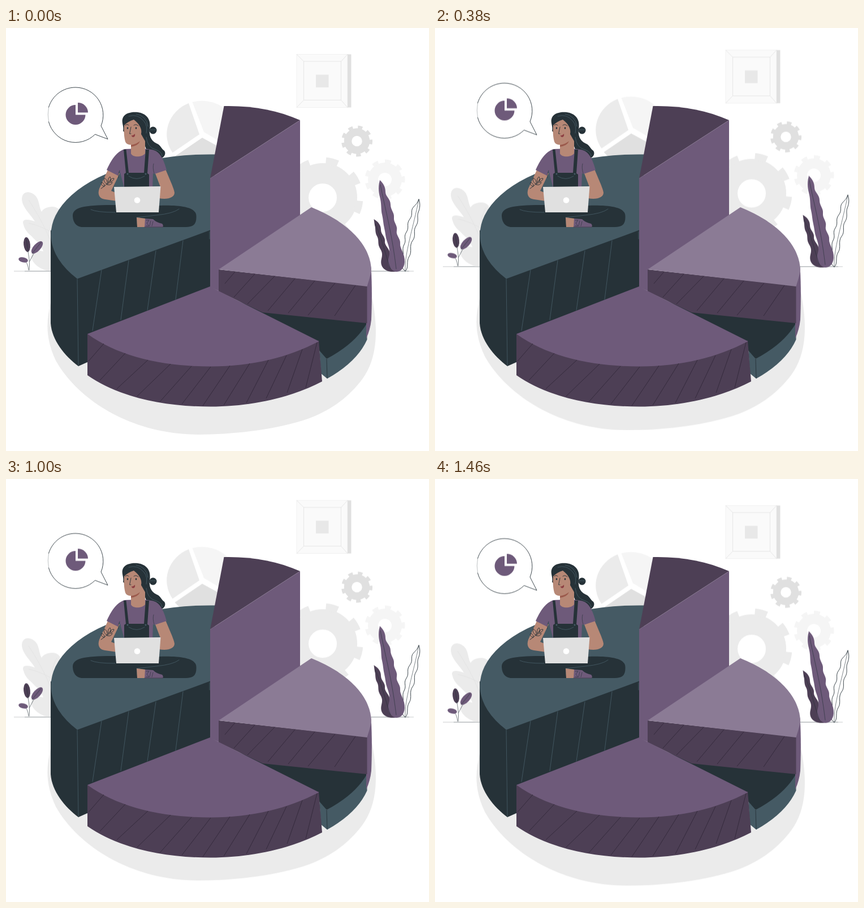
Write an HTML page that moves like this. It is 748x748 px and loops after 1500 ms.

```html
<!DOCTYPE html>
<html lang="en">
<head>
<meta charset="utf-8">
<title>Pie chart</title>
<style>
  html, body { margin: 0; width: 100%; height: 100%; overflow: hidden; background: #fff; }
  svg { display: block; width: 100%; height: 100%; }

  #backdrop { animation: float 1.5s linear -28ms infinite; }
  @keyframes float {
    0%, 100% { transform: translateY(.55px); }
    50% { transform: translateY(-14.3px); }
  }

  .purple { fill: #6e5a7a; }
  .plum { fill: #4d3f55; }
  .lilac { fill: #8b7b95; }
  .teal { fill: #455a64; }
  .ink { fill: #263238; }
  .skin { fill: #b78876; }
  .g1 { fill: #f5f5f5; }
  .g2 { fill: #ebebeb; }
  .g3 { fill: #e0e0e0; }
  .line { fill: none; stroke: #263238; stroke-width: .9; stroke-linecap: round; stroke-linejoin: round; }
  .fine { stroke-width: .6; }
  .seam { fill: none; stroke: #455a64; stroke-width: .9; stroke-linecap: round; }
  .vein { fill: none; stroke: #e2e2e2; stroke-width: .8; }
  .hatch { fill: none; stroke: #33293a; stroke-width: .9; }
  .gear { fill: none; }
</style>
</head>
<body>
<svg viewBox="0 0 748 748">
  <g id="backdrop">
    <!-- floor and shadow -->
    <path d="M14 430H721" stroke="#263238" stroke-width=".4" opacity=".6"/>
    <path d="M33 430H713" stroke="#263238" stroke-width=".5" opacity=".6"/>
    <path class="g2" d="M79 486C70 522 71 552 88 588C126 656 218 718 340 719C400 718.5 465 712 525 694C572 679 606 653 630 621C656 585 660 536 646 470Z"/>

    <!-- picture frame -->
    <path fill="#fafafa" stroke="#ececec" stroke-width=".7" d="M514 46.500H604V140.500H514Z"/>
    <path class="g3" d="M604 46.500H610.500V140.500H604Z"/>
    <path fill="none" stroke="#dedede" stroke-width=".7" d="M526.500 59H592.500V127.500H526.500ZM514 46.500L526.500 59M604 46.500L592.500 59M514 140.500L526.500 127.500M604 140.500L592.500 127.500"/>
    <path fill="#e8e8e8" d="M548 82.500H570.500V105H548Z"/>

    <!-- gears -->
    <g class="gear" stroke="#ebebeb">
      <circle cx="560" cy="300" r="43" stroke-width="36"/>
      <circle cx="560" cy="300" r="65" stroke-width="13" pathLength="16" stroke-dasharray=".84 1.160" transform="rotate(-85 560 300)"/>
    </g>
    <g class="gear" stroke="#e0e0e0">
      <circle cx="620.500" cy="200" r="16" stroke-width="13.500"/>
      <circle cx="620.500" cy="200" r="24.500" stroke-width="6" pathLength="18" stroke-dasharray=".95 1.050" transform="rotate(-86 620.500 200)"/>
    </g>
    <g class="gear" stroke="#f5f5f5">
      <circle cx="670" cy="268" r="21" stroke-width="18"/>
      <circle cx="670" cy="268" r="32" stroke-width="7" pathLength="18" stroke-dasharray=".95 1.050" transform="rotate(-90 670 268)"/>
    </g>

    <!-- wall chart -->
    <path class="g2" d="M323 133L342 188L294.500 220.500A63 59.500 0 0 1 323 133Z"/>
    <path class="g1" d="M329.500 131A63 59.500 0 0 1 403 215L350 184Z"/>
    <path class="g3" d="M347 194L298.500 227A63 59.500 0 0 0 400 223Z"/>

    <!-- speech bubble -->
    <path class="line" d="M75.500 140C82 119 101 105 123 105A49 49 0 0 1 168 173L180 196.500L157.500 188A49 49 0 0 1 75.500 166"/>
    <path class="line fine" opacity=".5" d="M75.500 140Q73 153 75.500 166"/>
    <path class="purple" d="M123 136V153.500H140.500A17.500 17.500 0 1 1 123 136Z"/>
    <path class="purple" d="M127 132A18 17.500 0 0 1 145 149.500H127Z"/>

    <!-- pale foliage -->
    <path class="g2" d="M28 303C28 290 39 287 49 294C60 302 57 314 63 325C66 318 79 314 88 317C96 320 98 327 95 335L86 429H72C57 425 45 414 45 404C45 395 57 392 66 395C62 382 53 377 45 368C43 366 34 360 31 348C26 336 41 338 51 342C44 330 29 318 28 303Z"/>
    <path class="vein" d="M40 304C54 326 69 350 84 390M40 345Q62 350 82 362M90 325Q81 340 82 356"/>

    <!-- sprig -->
    <path class="line fine" d="M41 428C43 411 39 398 37 384M41.500 413Q48 400 55 389M40 428Q39 415 31 409"/>
    <ellipse class="plum" cx="37" cy="383" rx="5.800" ry="13" transform="rotate(-6 37 383)"/>
    <ellipse class="purple" cx="55" cy="388" rx="6.300" ry="13.500" transform="rotate(42 55 388)"/>
    <ellipse class="purple" cx="30.500" cy="410" rx="8.500" ry="4.500" transform="rotate(14 30.500 410)"/>
    <path class="line fine" d="M36 373L39 396M62 379L46 399"/>

    <!-- tall plants -->
    <path class="line" d="M730 303C733 311 732 319 729 326S731 341 725 350S726 367 719 376S719 395 713 404S713 424 706 430C700 426 697 416 701 407S699 392 704 383S702 370 708 361S707 347 714 338S714 323 721 316S727 309 730 303"/>
    <path class="line fine" d="M706 430C704 400 721 350 730 303"/>
    <path class="plum" d="M650.500 338C659 343 663 349 663 357S671 369 670 377S679 390 679 400L692 431H681C667 429 661 420 664 408S663 394 660 387S660 375 656 368S654 354 652 349Z"/>
    <path class="purple" d="M661 269C668 275 671 282 671 290S680 302 680 312S687 326 686 335S693 349 691 358S698 372 697 381S706 399 705 414C704 426 697 432 688 431C676 425 674 415 677 405S677 386 674 378S671 362 669 354S667 338 665 330S664 312 662 303S657 284 661 269Z"/>
    <path class="line fine" d="M662 277C669 315 682 358 690 426M653 346C665 372 672 405 680 426"/>
  </g>

  <!-- large slice -->
  <path class="ink" d="M79 357V522C81 552 104 580 128 598L146 590L365 470V345L126 440Z"/>
  <path class="teal" d="M362 357L126 443.500A282 142 0 0 1 372 223.500Z"/>
  <path class="seam" d="M126 444L128 597M169 428L153 535M217 411L203 516M265 394L250 499M313 376L300 480M360 360V373"/>

  <!-- tall slice -->
  <path class="purple" d="M361 266L520 163V334L378 428V466L361 458Z"/>
  <path class="plum" d="M385.500 138C435 137 480 145 520 163L361 266Z"/>
  <path fill="none" stroke="#8b7b95" stroke-width=".6" d="M361 266L520 163"/>

  <!-- low slice -->
  <path class="teal" d="M553 553L567 585L638.500 521V551A282 150 0 0 1 568 620L557 611Z"/>
  <path class="ink" d="M376 462L454 495L638.500 515V521.500A282 150 0 0 1 567 585L545 560Z"/>
  <path class="line" d="M567 585L568 619"/>

  <!-- right slice -->
  <path class="purple" d="M637 457L645.500 422C647.500 455 647 490 646 516Q644 534 637 549Z"/>
  <path class="plum" d="M376 427L638.500 456V522L454 503L376 466Z"/>
  <path class="lilac" d="M540 317A270 142 0 0 1 646 430Q643 443 638.500 457L376 427Z"/>
  <path class="hatch" d="M405 431L387 452M440 435L403 476M475 439L427 488M511 443L463 500M546 447L499 504M582 451L534 508M618 455L581 509"/>

  <!-- front slice -->
  <path class="plum" d="M144 541V614C199 652 276 669.500 361 669.500C437 669.500 508 652 559 625L553 553Z"/>
  <path class="purple" d="M361 457L144 541C199 581 278 598.500 361 598.500C436 598.500 500 582 553.500 554L376 465Z"/>
  <path class="hatch" d="M173 558L146 589M211 575L166 623M251 587L196 638M291 594L232 651M328 598L272 661M362 599L311 665M396 597L348 668M431 593L385 667M464 587L425 663M496 579L460 655M524 568L497 645M550 556L530 636"/>

  <!-- hair -->
  <path class="ink" d="M207 182C209 173 203 166 207 158C211 150 223 148 233 149C248 151 256 161 254.500 175C252 190 256 199 266 204C274 207 274 213 280 217C284 223 279 231 270 231C262 231 255 227 252 222C247 216 247 208 243 203H228Z"/>
  <circle class="ink" cx="260" cy="181" r="6.500"/>
  <path class="seam" d="M217 156Q233 151 244 165Q251 173 248 186M230 152Q248 155 251 174M255 180H265M248 193Q250 211 264 215Q275 218 276 226"/>

  <!-- arms and shirt -->
  <path class="skin" d="M181 249L165 284C161 295 166 302 175 303L196 306V292L186 288L201 257Z"/>
  <path class="skin" d="M262 252L273 281L270 301C286 304 298 300 298 291C297 283 288 265 281 247Z"/>
  <path class="purple" d="M210 214C194 219 185 236 178 251L198 261L201 252L209 283H259L260 257L263 258L284 251C279 234 273 217 257 215L243 213Z"/>
  <path class="line fine" d="M201 252Q198 257 199 265M262 257Q259 247 261 240"/>
  <path class="skin" d="M221 198V222C224 229 240 229 246 222V200L238 186Z"/>
  <path fill="#9b5a4c" d="M221 206Q231 205 237 200Q234 208 221 210Z"/>

  <!-- face -->
  <path class="skin" d="M209 172C208 184 209 194 211 201C214 209 229 208 235 200L239 187C241 178 235 169 226 162Q216 165 209 172Z"/>
  <path class="line" d="M211 172Q214 169 217 172M226 172Q230 169 234 173M221 175L218.500 187H221"/>
  <path fill="#8d3f42" d="M221 190Q225 191 228 187Q229 193 224 193Z"/>
  <ellipse class="ink" cx="215" cy="177" rx="1.300" ry="1.800"/>
  <ellipse class="ink" cx="230" cy="177" rx="1.300" ry="1.800"/>

  <!-- dungarees -->
  <path class="ink" d="M208 215H212.500L217 256H244L247 215H253L250 257L253 259V284H209V258L212 256Z"/>
  <path class="seam" d="M217 262Q231 271 245 262"/>
  <circle class="teal" cx="215" cy="258" r="1.500"/>
  <circle class="teal" cx="247" cy="258" r="1.500"/>

  <!-- tattoo -->
  <path class="line" d="M168 284Q176 279 186 268M173 280Q167 278 169 273Q175 275 174 280M178 276Q171 271 174 265Q180 269 179 275M181 273Q179 266 184 263Q187 268 182 272M179 277Q186 279 188 273Q182 272 179 277M184 271Q190 272 191 266Q186 265 184 271"/>

  <!-- legs -->
  <path class="ink" d="M118 331C119 315 145 313 196 313L272 314C310 313 337 317 336.500 333C337 349 330 352 314 352H278L246 337L231 335L232 352H136C123 352 118 342 118 331Z"/>
  <path class="seam" d="M150 321Q160 326 193 326M306 320Q296 328 266 331L231 335"/>
  <path class="skin" d="M231 335L247 337V352H232Z"/>
  <path class="purple" d="M246 337L260 338Q266 344 276 346Q279 349 277 352.500H245Z"/>
  <path class="line fine" d="M248 340H253L249 345L253 350H248M256 341L254 350M260 342L258 350M245 352H277"/>

  <!-- laptop -->
  <path class="g3" d="M191 281L273.500 280L270 326H195Z"/>
  <circle fill="#fff" cx="232" cy="304.500" r="5.300"/>
</svg>
</body>
</html>
```
